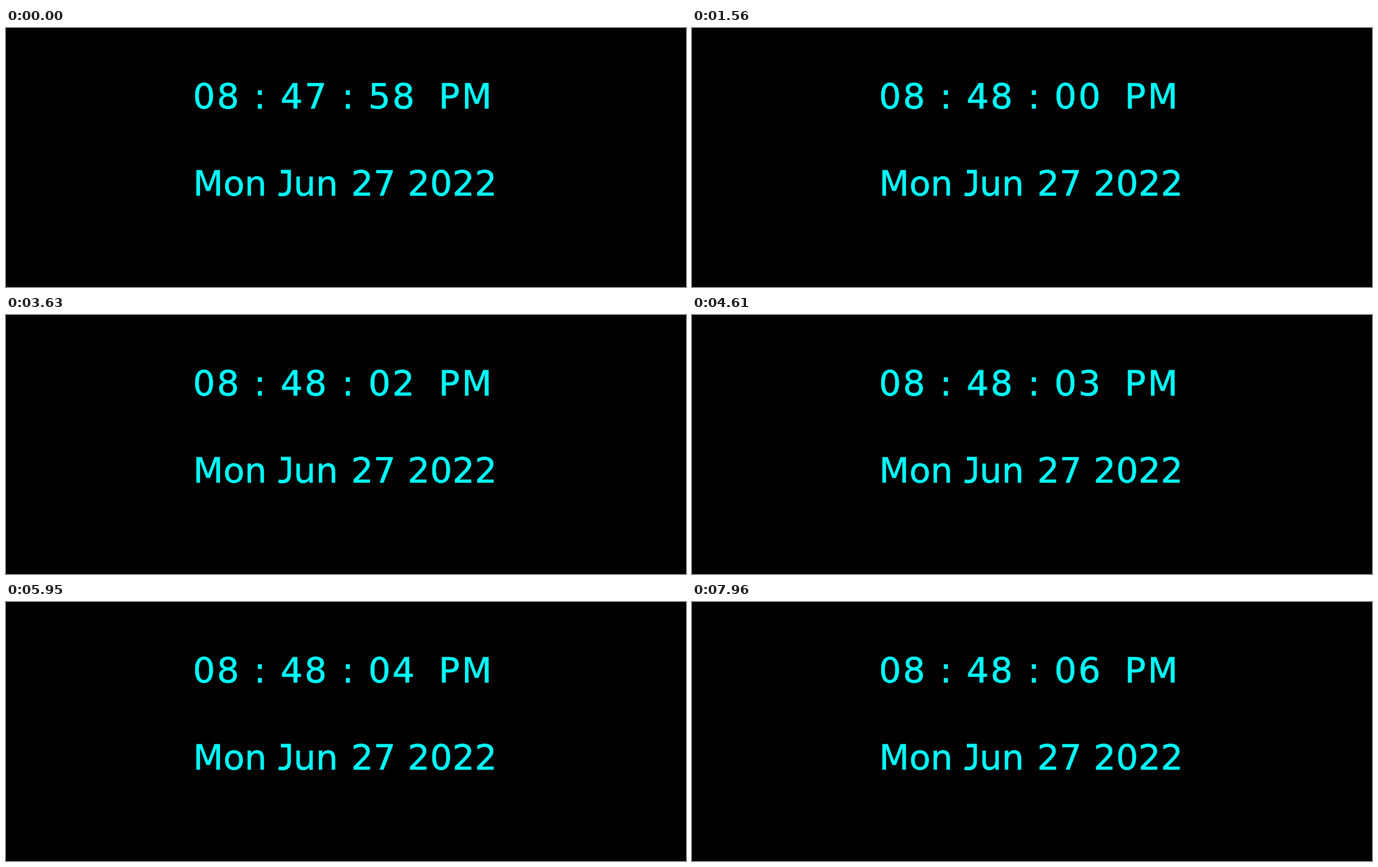
An HTML page with a canvas for the animation above (8.62 s loop, 935x357 px).

```html
<!DOCTYPE html>
<html lang="en">
<meta charset="utf-8">
<title>Clock</title>
<style>
  html, body { margin: 0; height: 100%; overflow: hidden; background: #000; }
  canvas { display: block; }
</style>
<canvas id="stage" width="935" height="357"></canvas>
<script>
const ctx = document.getElementById('stage').getContext('2d');
const LOOP = 8620;
// Start time of each clock reading: [ms, minutes, seconds]
const ticks = [
  [0, '47', '58'], [620, '47', '59'], [1560, '48', '00'], [2550, '48', '01'],
  [3560, '48', '02'], [4610, '48', '03'], [5950, '48', '04'],
  [6960, '48', '05'], [7960, '48', '06'],
];
// Pointer passes, one position per step
const passes = [
  { start: 3280, step: 70, path: [[752, 309], [641, 262], [602, 214], [492, 124], [387, 37]] },
  { start: 7700, step: 65, path: [[849, 334], [812, 306], [776, 306], [742, 334]] },
];

// A hairline outline gives the letters slightly more weight
function write(text, x, y, spacing) {
  ctx.letterSpacing = spacing + 'px';
  ctx.lineWidth = 0.5;
  ctx.fillText(text, x, y);
  ctx.strokeText(text, x, y);
}

function drawTime(hours, minutes, seconds, half, y) {
  write(hours, 257, y, 2.5);
  write(':', 341, y, 0);
  write(minutes, 377.5, y, 2.5);
  write(':', 462, y, 0);
  write(seconds, 498.2, y, 2.5);
  write(half, 595, y, 2.5);
}

function drawDate() {
  write('Mon', 257.3, 231, 0);
  write('un', 395.5, 231, 0.2);
  write('27', 474.5, 231, 0.2);
  write('2022', 552.3, 231, 0.2);
  // J with a top bar, resting on the baseline
  ctx.lineWidth = 4.8;
  ctx.stroke(new Path2D('M378 198H389.3V220Q389.3 229.6 380 229.6Q377 229.6 374.8 228.8'));
}

function drawPointer(x, y) {
  ctx.save();
  ctx.translate(x, y);
  ctx.fillStyle = '#fff';
  ctx.fill(new Path2D('M0 0V15L3.5 11.8L6 17.3L8.3 16.3L5.8 10.8H10.8Z'));
  ctx.restore();
}

function draw(now) {
  const t = now % LOOP;
  ctx.fillStyle = '#000';
  ctx.fillRect(0, 0, 935, 357);
  ctx.fillStyle = ctx.strokeStyle = '#0ff';
  ctx.font = '48px "DejaVu Sans", Verdana, sans-serif';

  if (t >= 5020 && t < 5950) {
    drawTime('00', '00', '00', 'AM', 140);
  } else {
    const [, minutes, seconds] = ticks.findLast(tick => tick[0] <= t);
    drawTime('08', minutes, seconds, 'PM', 111);
    drawDate();
  }
  for (const { start, step, path } of passes) {
    const point = path[Math.floor((t - start) / step)];
    if (point) drawPointer(...point);
  }
}

const origin = performance.now();
function frame() {
  draw(performance.now() - origin);
  requestAnimationFrame(frame);
}
frame();
</script>
</html>
```
